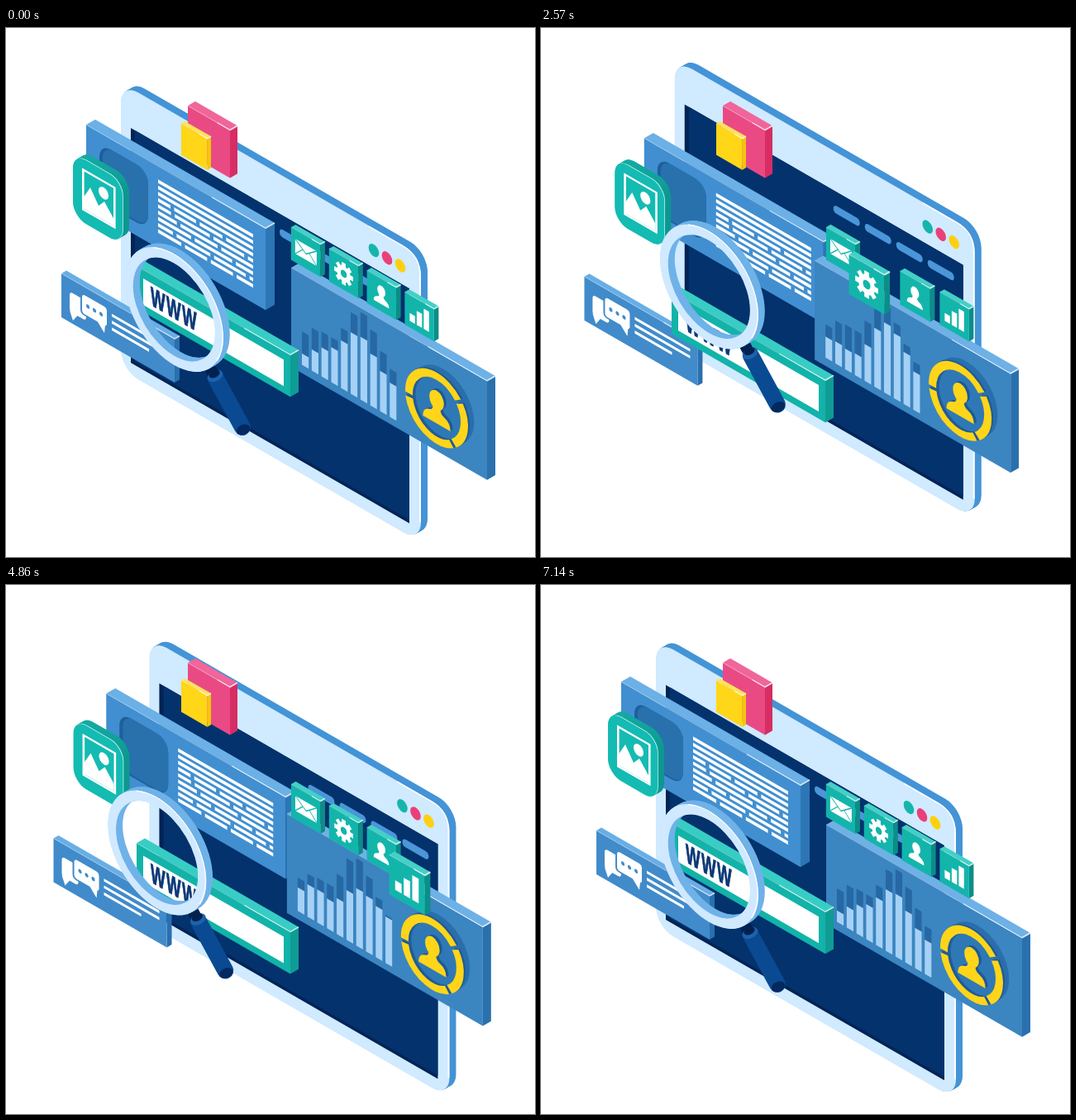
Write an HTML page with a canvas that moves like this. It is 640x640 px and loops after 7.21 s.

```html
<!DOCTYPE html>
<html lang="en">
<head>
<meta charset="utf-8">
<title>Isometric web search</title>
<style>
html, body { margin: 0; width: 100%; height: 100%; overflow: hidden; background: #fff; }
canvas { display: block; width: 100vw; height: 100vh; }
</style>
</head>
<body>
<canvas id="stage" width="640" height="640"></canvas>
<script>
const ctx = document.getElementById('stage').getContext('2d');
const LOOP = 7210, STEPS = 101, CYCLE = 100;
const K = 0.577;      // slope of the front faces
const NARROW = 0.866; // foreshortening across a front face
const TAU = Math.PI * 2;

// Swings by range and back, at rest at the given phase; zero at the loop start.
function sway(range, rest, sharp = 1) {
  const at = p => range * ((1 - Math.cos(TAU * (p - rest))) / 2) ** sharp;
  return p => at(p) - at(0);
}

const move = {
  tablet: [sway(41, 0.075), sway(-36, 0.85)],
  article: [sway(34, 0), sway(20, 0)],
  chart: [sway(-16.3, 0.95, 2), sway(-18.7, 0.05, 2)],
  chat: [sway(-16.4, 0.96), sway(11.4, 0.12)],
  photo: [sway(10.4, 0.85), sway(12.2, 0.09)],
  lens: [sway(-29, 0.18), sway(-30.6, 0.95)],
  search: [sway(0, 0), sway(35, 0.975, 0.75)]
};

function seeded(seed) {
  return () => (seed = (seed * 16807) % 2147483647) / 2147483647;
}

// Runs draw() in the sheared coordinates of a front face.
function face(x, y, draw) {
  ctx.save();
  ctx.transform(1, K, 0, 1, x, y);
  draw();
  ctx.restore();
}

function moved(name, p, draw) {
  ctx.save();
  ctx.translate(move[name][0](p), move[name][1](p));
  draw(p);
  ctx.restore();
}

function poly(color, ...pts) {
  ctx.fillStyle = color;
  ctx.beginPath();
  for (let i = 0; i < pts.length; i += 2) ctx.lineTo(pts[i], pts[i + 1]);
  ctx.fill();
}

function line(color, width, ...pts) {
  ctx.strokeStyle = color;
  ctx.lineWidth = width;
  ctx.beginPath();
  for (let i = 0; i < pts.length; i += 2) ctx.lineTo(pts[i], pts[i + 1]);
  ctx.stroke();
}

function rect(color, x, y, w, h) {
  ctx.fillStyle = color;
  ctx.fillRect(x, y, w, h);
}

function round(color, x, y, w, h, r) {
  ctx.fillStyle = color;
  ctx.beginPath();
  ctx.roundRect(x, y, w, h, { x: r * NARROW, y: r });
  ctx.fill();
}

function ellipse(color, x, y, rx, ry, turn = 0) {
  ctx.fillStyle = color;
  ctx.beginPath();
  ctx.ellipse(x, y, rx, ry, turn, 0, TAU);
  ctx.fill();
}

function disc(color, u, v, r) {
  ellipse(color, u, v, r * NARROW, r);
}

// Repeats draw() from the back of a solid to its front.
function extrude(depth, draw) {
  for (let d = depth; d > 0; d -= 0.5) {
    ctx.save();
    ctx.translate(d, -2 * K * d);
    draw();
    ctx.restore();
  }
}

function slab(x, y, w, h, d, [front, top, side], draw) {
  face(x, y, () => {
    const b = 2 * K * d;
    poly(top, 0, 0, w, 0, w + d, -b, d, -b);
    poly(side, w, 0, w + d, -b, w + d, h - b, w, h);
    rect(front, 0, 0, w, h);
    line('rgba(255,255,255,.35)', 1, 0, 0, w, 0);
    line('rgba(255,255,255,.8)', 1.2, w * 0.7, 0, w, 0, w + d, -b);
    if (draw) draw();
  });
}

function person(color, u, v, s) {
  ctx.save();
  ctx.translate(u, v);
  ctx.scale(s * NARROW, s);
  ellipse(color, 0, -5, 5.8, 6.6);
  ctx.beginPath();
  ctx.moveTo(-3, -1);
  ctx.lineTo(3, -1);
  ctx.quadraticCurveTo(2.5, 3, 6, 4);
  ctx.quadraticCurveTo(11, 5.5, 11, 11);
  ctx.lineTo(-11, 11);
  ctx.quadraticCurveTo(-11, 5.5, -6, 4);
  ctx.quadraticCurveTo(-2.5, 3, -3, -1);
  ctx.fill();
  ctx.restore();
}

function tablet() {
  const w = 363, h = 347, r = 24;
  face(139, 66, () => {
    extrude(8, () => round('#4494d7', 0, 0, w, h, r));
    round('#d0eaff', 0, 0, w, h, r);
    ctx.strokeStyle = '#fff';
    ctx.lineWidth = 1.8;
    ctx.beginPath();
    ctx.moveTo(w - 63, 1);
    ctx.lineTo(w - 21, 1);
    ctx.quadraticCurveTo(w - 1, 1, w - 1, r);
    ctx.lineTo(w - 1, h - r);
    ctx.stroke();
    rect('#022355', 12, 48, 337, 284);
    rect('#03326d', 17, 48, 332, 280);
    ['#16b5ac', '#ea4079', '#ffd00f'].forEach((c, i) => disc(c, 306 + 16 * i, 26.5, 7.3));
    for (let i = 0; i < 4; i++) round('#4a96d8', 192 + 38 * i, 65, 32, 9.5, 5);
  });
}

// The first rows run through, the others break into words.
function paragraph(u, v, width) {
  const rand = seeded(77);
  for (let row = 0; row < 9; row++) {
    const y = v + 7.55 * row;
    rect('#fff', u, y, width, 4.2);
    if (row < 3) continue;
    for (let x = 15 + 25 * rand(); x < width - 8; x += 28 + 22 * rand()) {
      rect(ARTICLE[0], u + x, y - 0.5, 4.5, 5.2);
    }
  }
}

const ARTICLE = ['#418fd0', '#6bb0e6', '#2c76b5'];

function article() {
  slab(97, 117, 217, 99, 11, ARTICLE, () => {
    round('#1d609c', 16, 13, 59, 70, 16);
    round('#2871ad', 20, 13, 55, 68, 15);
    paragraph(87, 16, 115);
  });
}

// A hump of bars; the light part of each one rises and falls in turn.
function bars(p) {
  for (let i = 0; i < 10; i++) {
    const u = 13 + 11.8 * i, base = 110 + 0.2 * i;
    const tall = 46 + 58 * Math.exp(-(((i - 5.95) / 2.4) ** 2)) + 8 * Math.sin(1.6 * i - 0.8) * (1 - i / 10);
    const light = tall * (0.55 + 0.03 * i) - 9 * Math.cos(TAU * (p - 0.05 - 0.12 * i));
    rect('#2668a4', u, base - tall, 8.2, tall);
    rect('#a5d1f6', u, base - light, 8.2, light);
  }
}

function badgeRing(color) {
  const gaps = [-37, 55, 175], rad = TAU / 360;
  ctx.strokeStyle = color;
  ctx.lineWidth = 9;
  gaps.forEach((from, i) => {
    const to = gaps[(i + 1) % 3];
    ctx.beginPath();
    ctx.ellipse(0, 0, 38.7 * NARROW, 38.7, 0, (from + 3) * rad, (to - 3) * rad);
    ctx.stroke();
  });
}

function badge() {
  ctx.translate(176, 68.5);
  extrude(8, () => disc('#2a6fac', 0, 0, 43));
  disc('#245f9b', 0, 0, 40);
  disc('#2f78b6', 4, -3, 34);
  extrude(2, () => badgeRing('#1f5a97'));
  badgeRing('#ffd51a');
  extrude(3, () => person('#1f5a97', 0, -1, 1.75));
  person('#ffd51a', 0, -1, 1.75);
}

function chart(p) {
  slab(345, 290, 237, 120, 10, ['#3b85c1', '#6eb1e7', '#2a70ad'], () => {
    bars(p);
    badge();
  });
}

function bubble(u, v, w, h, tail, tip) {
  round('#fff', u, v, w, h, 4);
  poly('#fff', tail - 5, v + h - 1, tail + 5, v + h - 1, tip, v + h + 9);
}

function chat() {
  const blue = '#418bca';
  slab(67, 297, 137, 53, 6, [blue, '#68aee6', '#2a6fae'], () => {
    bubble(10, 16, 20, 24, 15, 14);
    round(blue, 23, 8, 34, 27, 5);
    bubble(25, 10, 30, 23, 48, 52);
    for (let i = 0; i < 3; i++) disc(blue, 32 + 8 * i, 21.5, 2.4);
    [67, 67, 45].forEach((w, i) => rect('#fff', 61, 13.5 + 8.3 * i, w, 3.4));
  });
}

function photo() {
  const w = 60, h = 77, r = 18;
  face(81, 151, () => {
    const wall = ctx.createLinearGradient(10, 0, 68, 0);
    wall.addColorStop(0, '#13aaa2');
    wall.addColorStop(0.75, '#0fa098');
    wall.addColorStop(1, '#0c8b85');
    extrude(8, () => round(wall, 0, 0, w, h, r));
    round('#bff2ee', 0.8, -0.9, w, h, r);
    round('#14bbb2', 0, 0, w, h, r);
    ctx.strokeStyle = '#fff';
    ctx.lineWidth = 2.6;
    ctx.strokeRect(12.3, 13.3, 38, 48);
    disc('#fff', 37, 27.5, 7);
    poly('#fff', 13, 46, 21, 30, 31, 46, 38, 37, 49, 51, 49, 60, 13, 60);
  });
}

function search() {
  slab(158, 288, 186, 51, 10, ['#12b3a9', '#38cdc4', '#0f9c94'], () => {
    rect('#fff', 8, 10.5, 170, 32);
    ctx.translate(17, 37);
    ctx.scale(0.58, 1);
    ctx.font = 'bold 32px "Liberation Sans", Arial, sans-serif';
    ctx.letterSpacing = '2.5px';
    ctx.fillStyle = ctx.strokeStyle = '#0b3876';
    ctx.lineWidth = 1;
    ctx.fillText('WWW', 0, 0);
    ctx.strokeText('WWW', 0, 0);
  });
}

const TEAL = ['#13b5ab', '#42d0c7', '#0d8d87'];

function envelope() {
  rect('#fff', 5, 11, 26, 18);
  line(TEAL[0], 1.2, 5, 11, 18, 22, 31, 11);
  line(TEAL[0], 1, 5, 29, 14, 19);
  line(TEAL[0], 1, 31, 29, 22, 19);
}

function gear() {
  ctx.translate(17.8, 20);
  ctx.scale(NARROW, 1);
  for (let i = 0; i < 8; i++) {
    ctx.rotate(TAU / 8);
    rect('#fff', -2.7, -13.2, 5.4, 8);
  }
  ctx.scale(1 / NARROW, 1);
  disc('#fff', 0, 0, 9.6);
  disc(TEAL[0], 0, 0, 4.3);
}

function user() {
  person('#fff', 17.5, 20, 0.98);
}

function columns() {
  for (let i = 0; i < 3; i++) rect('#fff', 6 + 8.5 * i, 22 - 7.5 * i, 6.4, 9.5 + 7.5 * i);
}

// Tiles step forward one after another.
function tile(icon, i, p) {
  const d = Math.min(1, Math.abs(p - 0.17 - 0.165 * i) / 0.18);
  const pop = (1 + Math.cos(Math.PI * d)) / 2, size = 1 + 0.22 * pop;
  ctx.save();
  ctx.translate(365.5 + 45.8 * i - 14.7 * pop, 269 + 26.1 * i + 13.3 * pop);
  ctx.scale(size, size);
  slab(-20.5, -28, 35.5, 39.5, 5.5, TEAL, icon);
  ctx.restore();
}

function annulus(color) {
  ctx.fillStyle = color;
  ctx.beginPath();
  for (const r of [67.2, 56]) {
    ctx.moveTo(r * 0.885, 0);
    ctx.ellipse(0, 0, r * 0.885, r, 0, 0, TAU);
  }
  ctx.fill('evenodd');
}

function lens() {
  line('#02214f', 14, 242, 402, 254, 425);
  ctx.lineCap = 'round';
  line('#0a4a92', 20, 254, 424, 286, 483);
  ellipse('#1c62ac', 253, 421, 10, 6.5, -0.45);
  ellipse('#02214f', 252, 418.5, 7, 4.5, -0.45);
  ellipse('#03295f', 287, 486, 8.5, 6, -0.45);
  face(203.3, 340.5, () => {
    extrude(8, () => annulus('#6fb2e8'));
    annulus('#d0e9ff');
    ctx.strokeStyle = '#fff';
    ctx.lineWidth = 1.4;
    ctx.beginPath();
    ctx.ellipse(0, 0, 59, 66.7, 0, -2, 0.5);
    ctx.stroke();
  });
}

function render(p) {
  rect('#fff', 0, 0, 640, 640);
  moved('tablet', p, tablet);
  slab(220, 94, 51, 58, 9, ['#ea4a84', '#f0669a', '#d62d64']);
  slab(212, 115.5, 31.5, 38, 4.5, ['#ffd618', '#ffe25a', '#f3c60f']);
  moved('article', p, article);
  moved('chart', p, chart);
  [envelope, gear, user, columns].forEach((icon, i) => tile(icon, i, p));
  moved('chat', p, chat);
  moved('photo', p, photo);
  moved('search', p, search);
  moved('lens', p, lens);
}

let start;
function tick(now) {
  if (start === undefined) start = now;
  const step = Math.floor(((now - start + 5) % LOOP) * STEPS / LOOP);
  render(step % CYCLE / CYCLE);
  requestAnimationFrame(tick);
}
render(0);
requestAnimationFrame(tick);
</script>
</body>
</html>
```
